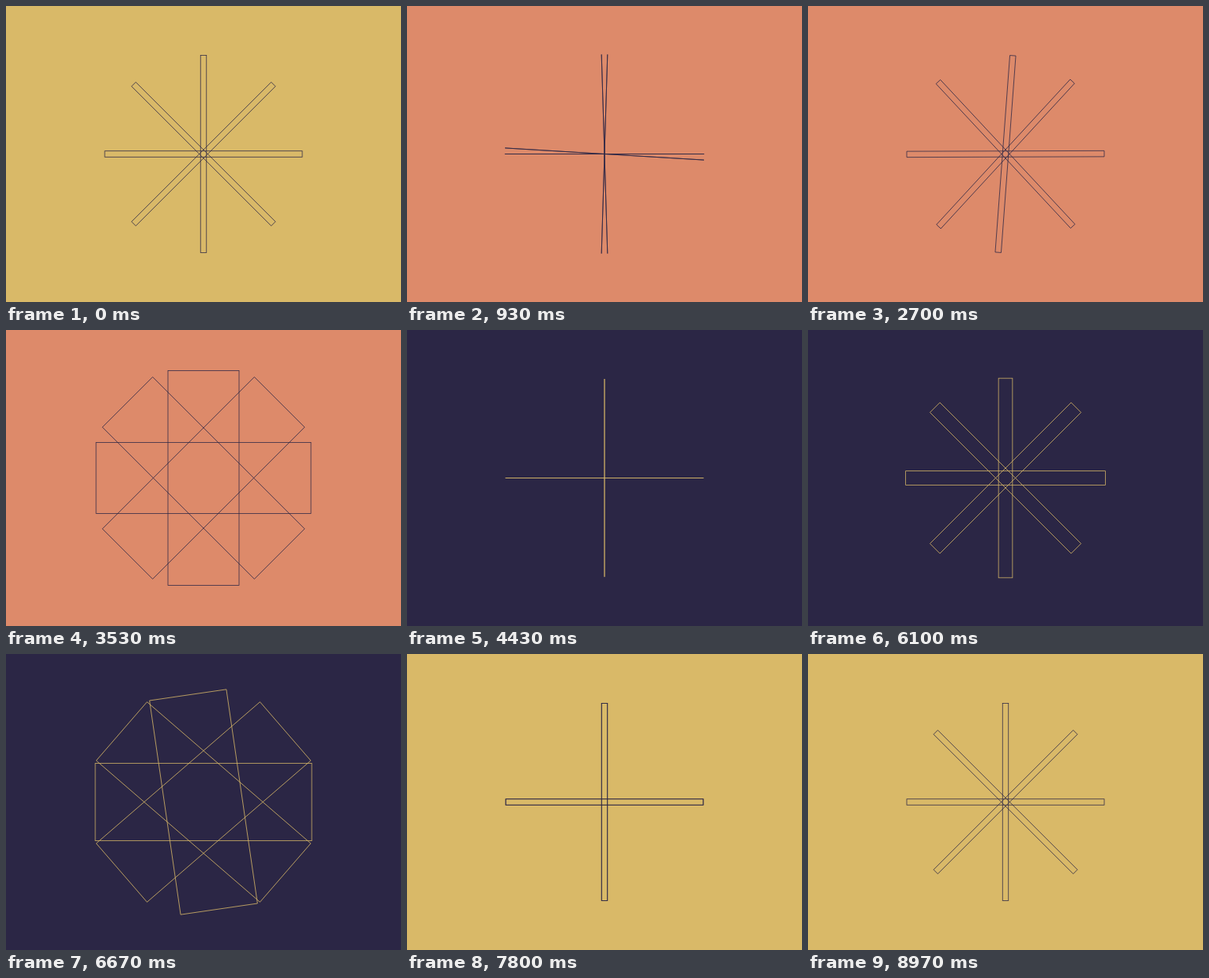
Write an HTML page with a canvas that moves like this. It is 500 px wide and 375 px high and loops after 9010 ms.

```html
<!DOCTYPE html>
<html lang="en">
<head>
<meta charset="utf-8">
<title>Turning bars</title>
<style>
  html, body { margin: 0; width: 100%; height: 100%; overflow: hidden; }
  canvas { display: block; }
</style>
</head>
<body>
<canvas width="500" height="375"></canvas>
<script>
const ctx = document.querySelector('canvas').getContext('2d');
const LOOP = 9010, CYCLE = 3000, SHIFT = 1570;
const GOLD = [217, 185, 104], SALMON = [221, 138, 106], NAVY = [43, 38, 69];
const themes = [
  { back: GOLD, line: NAVY },
  { back: SALMON, line: NAVY },
  { back: NAVY, line: GOLD }
];
// Each bar turns from one arm of the cross to its place in the star.
const bars = [[0, 0], [90, 45], [0, 90], [90, 135]];

const span = (t, start, end) => Math.min(1, Math.max(0, (t - start) / (end - start)));
const mix = (a, b, k) => a + (b - a) * k;
const blend = (a, b, k) => `rgb(${a.map((v, i) => Math.round(mix(v, b[i], k)))})`;

// Cubic Bezier (0.46, 0, 0.235, 1), solved by bisection.
function glide(x) {
  if (x <= 0 || x >= 1) return x;
  let low = 0, high = 1, s;
  for (let i = 0; i < 24; i++) {
    s = (low + high) / 2;
    const r = 1 - s;
    if (3 * r * r * s * 0.46 + 3 * r * s * s * 0.235 + s * s * s < x) low = s;
    else high = s;
  }
  return s * s * (3 - 2 * s);
}

function backInOut(x) {
  const c = 2.5949;
  const half = y => y * y * ((c + 1) * y - c) / 2;
  return x < 0.5 ? half(2 * x) : 1 - half(2 - 2 * x);
}

function draw(time) {
  const clock = time % LOOP + SHIFT;
  const t = clock % CYCLE;
  const index = Math.floor(clock / CYCLE);
  const from = themes[index % 3], to = themes[(index + 1) % 3];

  const open = glide(span(t, 0, 370));
  const turn = glide(span(t, 500, 1540));
  const grow = glide(span(t, 1560, 2060));
  const rest = 1 - backInOut(span(t, 2130, 2690));
  const tint = span(t, 2320, 2440);

  const width = Math.max(0, mix(7.5 * open, 90, grow) * rest);
  const length = 250 + Math.max(22 * grow * rest, -60 * rest);
  const sway = 3.7 * turn * (1 - turn);

  ctx.fillStyle = blend(from.back, to.back, tint);
  ctx.fillRect(0, 0, 500, 375);
  ctx.strokeStyle = blend(from.line, to.line, tint);
  ctx.lineWidth = 0.75;
  for (const [start, end] of bars) {
    ctx.save();
    ctx.translate(250, 187.5);
    ctx.rotate(-(mix(start, end, turn * rest) + sway) * Math.PI / 180);
    ctx.strokeRect(-length / 2, -width / 2, length, width);
    ctx.restore();
  }
}

const begin = performance.now();
function tick() {
  draw(performance.now() - begin);
  requestAnimationFrame(tick);
}
tick();
</script>
</body>
</html>
```
